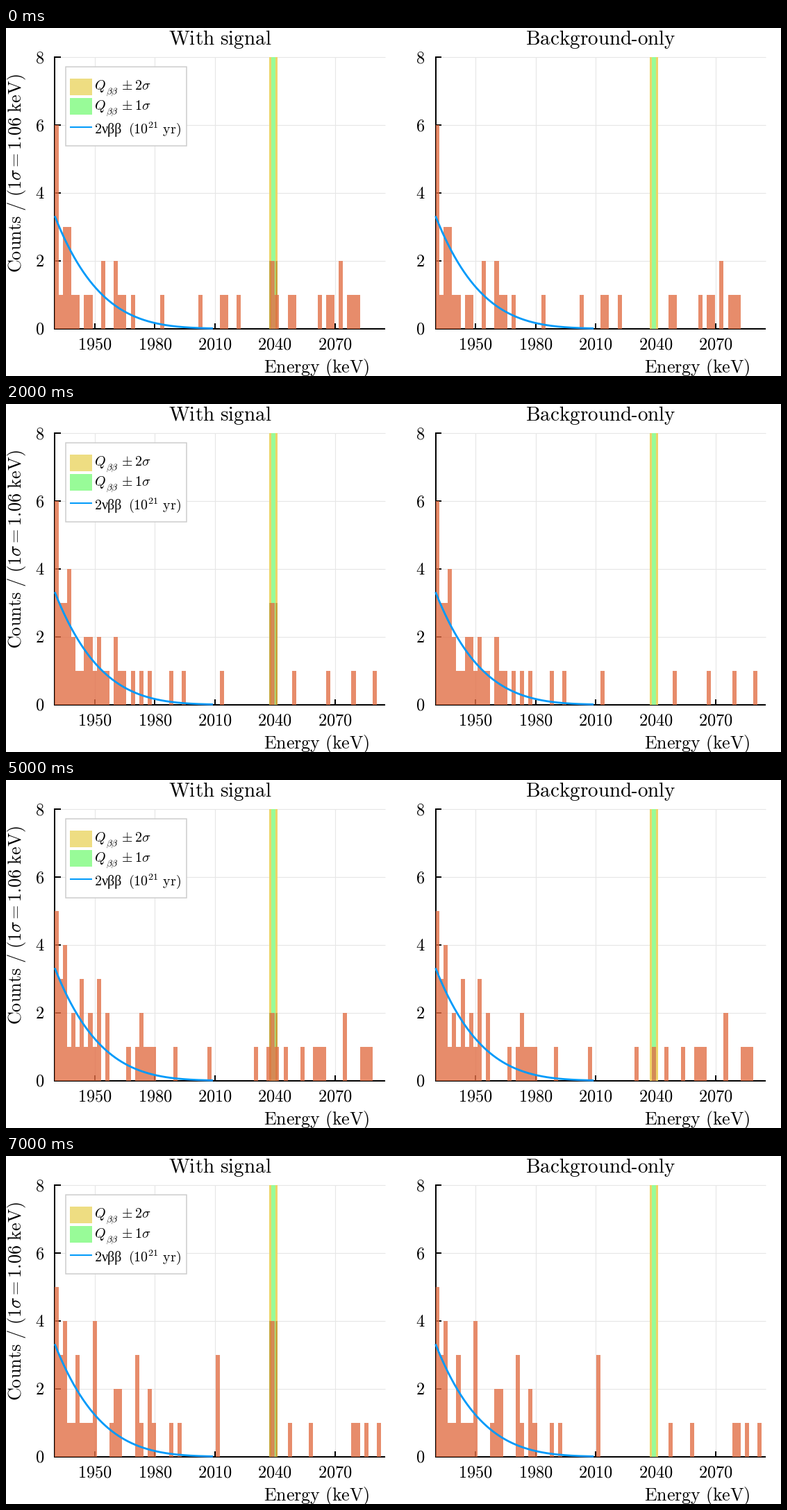
Animation, 1116 px wide and 502 px high, one loop 8000 ms. Source, as a matplotlib script:

```python
import matplotlib.pyplot as plt
import numpy as np
from matplotlib.animation import FuncAnimation
from matplotlib.patches import Rectangle

W, H, DPI = 1116, 502, 64
PT = 72 / DPI                       # points per pixel
BASE, UNIT = 433.6, 48.9            # pixel row of zero, pixels per count
E_MIN, E_MAX, SCALE = 1930, 2095, 2.883
Q, SIGMA = 2039.06, 1.06
BINS, BIN_W, FIRST_EDGE = 77, 2.12, 1931.9
LEFT, RIGHT = 70.2, 618.5

BAR, BLUE = "#e26f46", "#009afa"
GOLD, GREEN, OLIVE = "#eedd82", "#98fb98", "#c9a640"

plt.rcParams["mathtext.fontset"] = "cm"
fig = plt.figure(figsize=(W / DPI, H / DPI), dpi=DPI, facecolor="white")
ax = fig.add_axes([0, 0, 1, 1])
ax.set_xlim(0, W)
ax.set_ylim(H, 0)
ax.axis("off")


def line(xs, ys, color="black", width=2.0, z=2, **kw):
    ax.plot(xs, ys, color=color, lw=width * PT, zorder=z,
            solid_capstyle="butt", **kw)


def rect(x0, y0, x1, y1, color, z, **kw):
    patch = Rectangle((x0, y0), x1 - x0, y1 - y0, fc=color, zorder=z,
                      **{"lw": 0, **kw})
    return ax.add_patch(patch)


def label(x, y, text, size, ha="center", **kw):
    """Text in pixels, anchored on its baseline."""
    ax.text(x, y, text, fontsize=size * PT, ha=ha, va="baseline",
            zorder=9, **kw)


def roman(text):
    return r"$\mathrm{%s}$" % text.replace(" ", r"\ ")


def counts(*levels):
    """Histogram from the bins holding one count, two counts, and so on."""
    hist = np.zeros(BINS, int)
    for n, bins in enumerate(levels, 1):
        hist[list(bins)] = n
    return hist


class Panel:
    def __init__(self, x0):
        self.x0 = x0
        self.draw_axes()
        for half, color in ((2, "#eed468"), (1, GREEN)):
            rect(self.x(Q - half * SIGMA), BASE - 8 * UNIT,
                 self.x(Q + half * SIGMA), BASE, color, 3)
        self.strips = [self.strip(-2), self.strip(1)]
        self.bars = [self.bar(k) for k in range(BINS)]
        e = np.linspace(E_MIN, 2009, 200)
        rate = 3.32 * ((Q - e) / (Q - E_MIN)) ** 4.9
        line(self.x(e), BASE - UNIT * rate, BLUE, 2.8, z=6)

    def x(self, energy):
        return self.x0 + (energy - E_MIN) * SCALE

    def draw_axes(self):
        top, end = BASE - 8 * UNIT, self.x(E_MAX)
        for n in range(0, 9, 2):
            y = BASE - n * UNIT
            line([self.x0, end], [y, y], "#e6e6e6", 1.1, z=1)
            line([self.x0, self.x0 + 8.5], [y, y])
            label(self.x0 - 21.5, y + 8, roman(str(n)), 24.3)
        for e in range(1950, 2071, 30):
            x = self.x(e)
            line([x, x], [top, BASE], "#e6e6e6", 1.1, z=1)
            line([x, x], [BASE - 7.5, BASE])
            label(x, 463, roman(str(e)), 24.3)
        line([self.x0, self.x0], [top - 1, BASE + 1])
        line([self.x0 - 1, end], [BASE, BASE])
        label(self.x0 + 377, 496.7, roman("Energy (keV)"), 26)

    def strip(self, k):
        return rect(self.x(Q + k * SIGMA), BASE,
                    self.x(Q + (k + 1) * SIGMA), BASE, OLIVE, 4)

    def bar(self, k):
        right = FIRST_EDGE + k * BIN_W
        left = max(right - BIN_W, E_MIN)
        return rect(self.x(left), BASE, self.x(right), BASE, BAR, 5, alpha=0.8)

    def show(self, hist, peak=0):
        for bar, n in zip(self.bars, hist):
            bar.set_height(-n * UNIT)
        for strip in self.strips:
            strip.set_height(-peak * UNIT)


def draw_legend():
    rect(86, 56, 259.5, 170, "white", 7, ec="#cccccc", lw=1.5 * PT)
    for y, color, n in ((72.5, GOLD, 2), (101, GREEN, 1)):
        rect(92, y, 123.5, y + 24, color, 8)
        base = y + 16.5
        label(127, base, "$Q$", 20, "left")
        label(143.5, base + 6, r"$\beta\beta$", 13.5, "left")
        label(166, base, r"$\pm\:%d\sigma$" % n, 20, "left")
    line([92, 123.5], [142.5, 142.5], BLUE, 2, z=8)
    label(127, 152, "$2$", 20, "left")
    label(137.5, 152, "νββ", 20, "left", family="Liberation Serif")
    label(175.5, 152, r"$\mathrm{(10^{21}\ yr)}$", 20, "left")


signal_panel, plain_panel = Panel(LEFT), Panel(RIGHT)
draw_legend()
label(308.5, 24.3, roman("With signal"), 29.2)
label(747.5, 24.3, roman("Background"), 29.2, "left")
line([901, 908.3], [17.8, 17.8], width=1.8)
label(965, 24.3, roman("only"), 29.2, "right")
label(21.8, 209.5, r"$\mathrm{Counts\ /\ (1\sigma = 1.06\ keV)}$", 26.2,
      rotation=90, rotation_mode="anchor")

# Each experiment: background counts, then the extra signal counts per bin.
runs = []


def experiment(background, signal):
    total = background.copy()
    for k, n in signal.items():
        total[k] += n
    runs.append((total, background))


experiment(counts([1, 4, 5, 7, 8, 15, 16, 18, 25, 34, 39, 40, 43, 55, 56,
                   62, 64, 65, 69, 70, 71],
                  [11, 14, 67], [2, 3], [], [], [0]),
           {51: 2, 52: 1})
experiment(counts([3, 6, 7, 9, 11, 12, 15, 16, 19, 20, 21, 22, 27, 31, 32,
                   35, 54, 70, 74],
                  [13, 14, 23], [0, 2, 8, 10], [4], [1, 5]),
           {51: 4, 53: 1})
experiment(counts([5, 6, 9, 11, 12, 15, 16, 18, 20, 22, 27, 30, 39, 56, 64,
                   70, 75],
                  [4, 7, 8, 10, 14], [1, 2], [3], [], [0]),
           {51: 3})
experiment(counts([5, 10, 11, 14, 16, 21, 24, 26, 29, 34, 42, 45, 56, 61,
                   64, 74],
                  [4, 12, 13, 18], [1, 2, 7], [3, 8], [0]),
           {51: 2})
experiment(counts([3, 5, 7, 9, 11, 12, 15, 17, 19, 22, 23, 28, 33, 40, 55,
                   62, 70, 73],
                  [4, 6, 10, 14], [1, 2, 8], [], [0]),
           {51: 3})
experiment(counts([3, 5, 7, 9, 17, 19, 21, 22, 23, 28, 36, 47, 51, 54, 58,
                   61, 62, 63, 72, 73, 74],
                  [4, 8, 12, 20, 68], [1, 6, 10], [2], [0]),
           {50: 1, 51: 1, 52: 1})
experiment(counts([2, 3, 9, 10, 12, 13, 16, 18, 19, 22, 37, 38, 40, 41, 43,
                   45, 72, 73, 75, 76],
                  [7, 17, 26], [1, 6, 29], [0, 4, 5, 8]),
           {50: 1, 51: 3})
experiment(counts([3, 4, 6, 7, 8, 13, 20, 23, 27, 29, 55, 60, 70, 71, 73,
                   76],
                  [14, 15, 22], [1, 5, 19, 38], [2, 9], [0]),
           {51: 4})


def update(i):
    total, background = runs[i]
    signal_panel.show(total, total[51])
    plain_panel.show(background)
    return []


anim = FuncAnimation(fig, update, frames=len(runs), interval=1000,
                     init_func=lambda: update(0), repeat=True, repeat_delay=0)
plt.show()
```
